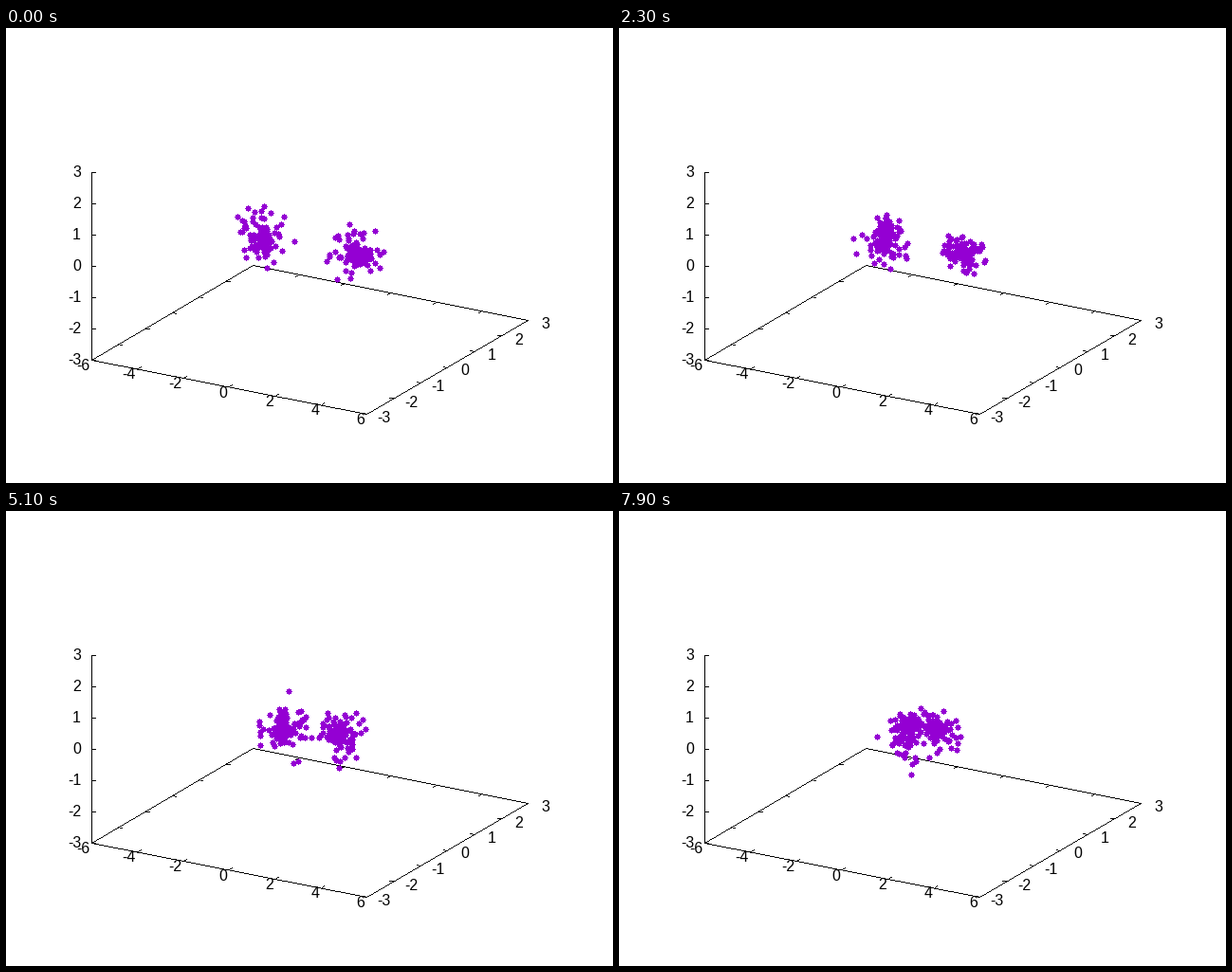
A matplotlib script that plays this animation: 640 px wide and 480 px high, repeating every 8 s.

```python
import numpy as np
import matplotlib.pyplot as plt
from matplotlib.animation import FuncAnimation
from matplotlib.collections import PolyCollection

W, H, FRAMES = 640, 480, 80
CORE, HALO = 88, 16
TICK = 4

fig = plt.figure(figsize=(W / 100, H / 100), dpi=100, facecolor="white")
ax = fig.add_axes([0, 0, 1, 1])
ax.set(xlim=(0, W), ylim=(H, 0))
ax.axis("off")


def add_shapes(verts, color, z):
    shapes = PolyCollection(verts, facecolors=color, edgecolors="none",
                            antialiaseds=False, snap=False, zorder=z)
    ax.add_collection(shapes, autolim=False)
    return shapes


def pixel_line(p, q):
    """Hard-edged line, one pixel per step along its longer side."""
    p, q = np.rint(p), np.rint(q)
    steps = int(np.abs(q - p).max())
    return np.rint(np.linspace(p, q, steps + 1))


def label(x, y, value, ha):
    ax.text(x, y + 5, str(value), ha=ha, va="baseline", color="black",
            family="Liberation Sans", size=11.52)


def draw_axes():
    left, front, right, back = map(np.array, [(90, 350), (380, 407), (550, 308), (260, 250)])
    x_tick = (front - left) / np.hypot(*(front - left)) * TICK
    y_tick = (right - front) / np.hypot(*(right - front)) * TICK
    lines = [(left, front), (front, right), (right, back), (back, left),
             (left - (0, 198), left)]

    for k in range(7):
        f = k / 6
        near, far = left + f * (front - left), back + f * (right - back)
        label(near[0] - 1.5, near[1] + 6, 2 * k - 6, "right")

        west, east = left + f * (back - left), front + f * (right - front)
        label(east[0] + 18.5, east[1] + 4, k - 3, "center")

        up = left - (0, 33 * k)
        label(79, up[1], k - 3, "right")

        lines += [(near, near + y_tick), (far, far - y_tick),
                  (west, west + x_tick), (east, east - x_tick),
                  (up, up + (TICK, 0))]

    pixels = np.unique(np.concatenate([pixel_line(p, q) for p, q in lines]), axis=0)
    square = np.array([(0, 0), (1, 0), (1, 1), (0, 1)])
    add_shapes(pixels[:, None, :] + square, "black", 1)


def make_disc():
    """A 5 px square with a 1 px bump on each side."""
    side = np.array([(-2, -2), (0, -2), (0, -3), (1, -3), (1, -2), (3, -2)]) - 0.5
    turn = np.array([[0, 1], [-1, 0]])
    return np.concatenate([side @ np.linalg.matrix_power(turn, i) for i in range(4)]) + 0.5


def make_core(rng):
    """Stars on random ellipses close to the centre."""
    size = rng.uniform(0.6, 1.3, (CORE, 1))
    a, b = rng.normal(0, 9, (2, CORE, 2)) * size
    speed = rng.uniform(0.08, 0.2, (CORE, 1)) / size
    return lambda t: a * np.cos(speed * t) + b * np.sin(speed * t)


def make_halo(rng):
    """Slow wide orbits that sag downwards as the clusters meet."""
    radius = rng.uniform(20, 35, (HALO, 1))
    phase = rng.uniform(0, 2 * np.pi, (HALO, 1))
    tilt = rng.uniform(0.3, 1, (HALO, 1)) * rng.choice([-1, 1], (HALO, 1))
    speed = rng.uniform(0.03, 0.07, (HALO, 1))
    a = radius * np.hstack([np.cos(phase), np.sin(phase)])
    b = radius * tilt * np.hstack([-np.sin(phase), np.cos(phase)])

    def at(t):
        pos = a * np.cos(speed * t) + b * np.sin(speed * t)
        pos[:, 1] += 0.4 * t / FRAMES * np.abs(pos[:, 1])
        return pos

    return at


def centers(t):
    u = t / (FRAMES - 1)
    return np.array([(270 + 34 * u, 221 + 12 * u ** 2),
                     (369 - 35 * u ** 1.5, 239 - 9 * u)])


rng = np.random.default_rng(12)
clusters = [(make_core(rng), make_halo(rng)) for _ in range(2)]
disc = make_disc()

draw_axes()
dots = add_shapes([], "#9400d3", 5)


def update(t):
    pts = np.vstack([mid + part(t)
                     for mid, parts in zip(centers(t), clusters)
                     for part in parts])
    dots.set_verts(np.rint(pts)[:, None, :] + disc)
    return (dots,)


anim = FuncAnimation(fig, update, frames=FRAMES, interval=100,
                     repeat=True, repeat_delay=0, blit=False)
plt.show()
```
